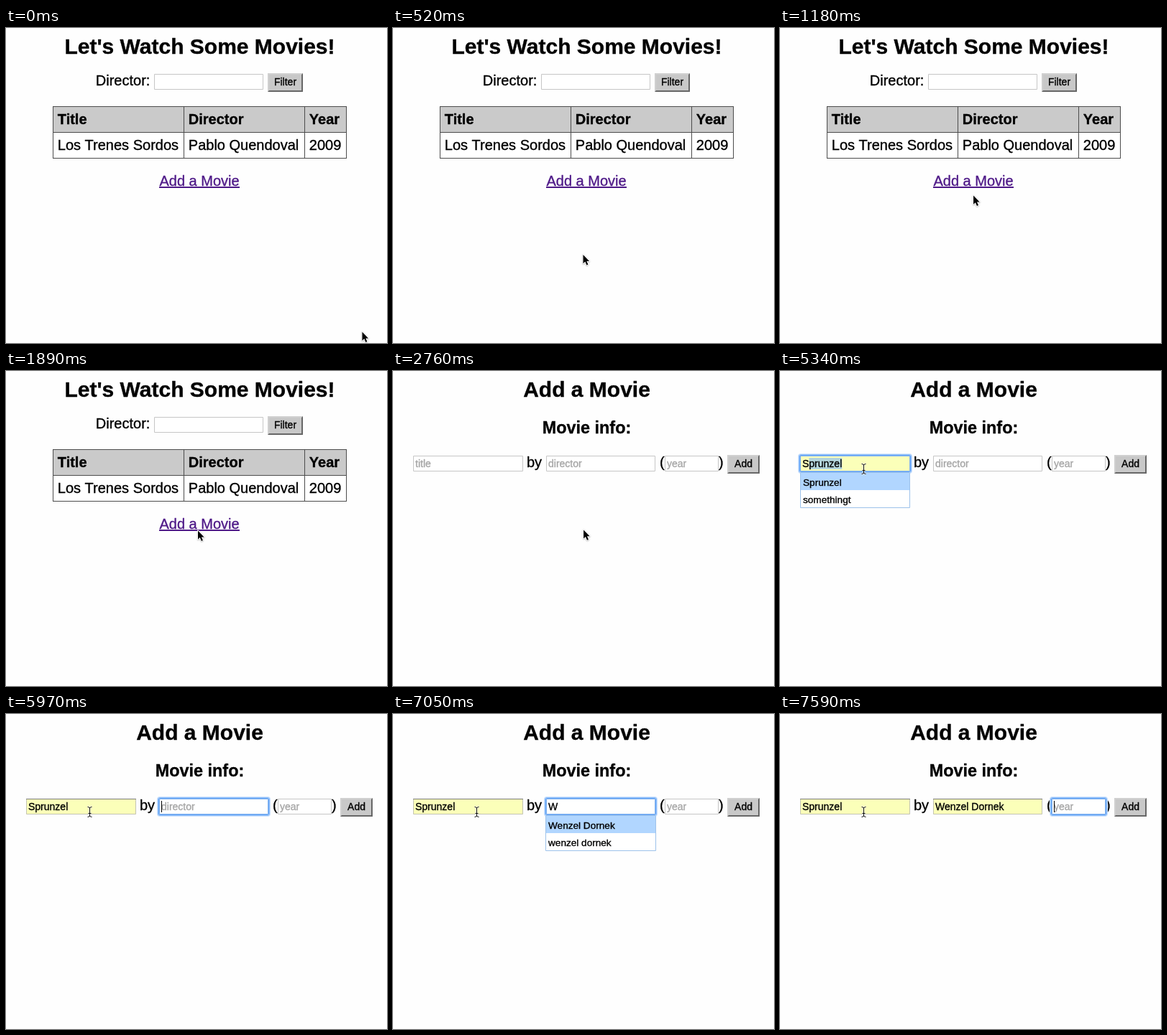
Animation of 530 by 439 pixels, one loop 8000 ms. Source, as an HTML page with a canvas:

```html
<!DOCTYPE html>
<html lang="en">
<head>
<meta charset="utf-8">
<title>Movies</title>
<style>
html, body { margin: 0; width: 100%; height: 100%; overflow: hidden; background: #fefefe; }
canvas { display: block; }
</style>
</head>
<body>
<canvas id="stage" width="530" height="439"></canvas>
<script>
const ctx = document.getElementById('stage').getContext('2d');
const LOOP = 8000;
const FONT = '"Liberation Sans", Arial, sans-serif';
const TITLE = 'Sprunzel', DIRECTOR = 'Wenzel Dornek';
const YELLOW = '#fbffb9', PICKED = '#b1d6ff';

const smooth = p => p * p * (3 - 2 * p);
const easeOut = p => 1 - Math.pow(1 - p, 2.4);

function rect(x, y, w, h, color) {
  ctx.fillStyle = color;
  ctx.fillRect(x, y, w, h);
}

function frame(x, y, w, h, color) {
  ctx.strokeStyle = color;
  ctx.lineWidth = 1;
  ctx.strokeRect(x + 0.5, y + 0.5, w - 1, h - 1);
}

// A hairline stroke gives the text its slightly heavy look.
function text(str, x, y, size, color = '#000', weight = 'normal', align = 'left') {
  ctx.font = `${weight} ${size}px ${FONT}`;
  ctx.textAlign = align;
  ctx.fillStyle = ctx.strokeStyle = color;
  ctx.lineWidth = 0.35;
  ctx.lineJoin = 'round';
  ctx.fillText(str, x, y);
  ctx.strokeText(str, x, y);
}

function heading(str, y, size) {
  text(str, 269.5, y, size, '#000', 'bold', 'center');
}

function widthOf(str, size) {
  ctx.font = `${size}px ${FONT}`;
  return ctx.measureText(str).width;
}

function button(label, x, y, w) {
  const h = 26;
  rect(x, y, w, h, '#676767');
  ctx.beginPath();
  ctx.moveTo(x, y);
  ctx.lineTo(x + w, y);
  ctx.lineTo(x + w - 2, y + 2);
  ctx.lineTo(x + 2, y + h - 2);
  ctx.lineTo(x, y + h);
  ctx.fillStyle = '#d0d0d0';
  ctx.fill();
  rect(x + 2, y + 2, w - 4, h - 4, '#c8c8c8');
  text(label, x + w / 2, y + 17, 14, '#000', 'normal', 'center');
}

function focusRing(x, y, w, h) {
  ['#cfe3fd', '#92c1fa', '#68a6f5'].forEach((color, i) => {
    const out = 2.5 - i;
    ctx.beginPath();
    ctx.roundRect(x - out, y - out, w + 2 * out, h + 2 * out, 3.5 - i);
    ctx.strokeStyle = color;
    ctx.lineWidth = 1.1;
    ctx.stroke();
  });
  frame(x, y, w, h, '#83b3ef');
}

// Text field; `typed` is the part before the selected completion.
function field(x, y, w, o = {}) {
  const h = 22, tx = x + 3, base = y + 16;
  rect(x, y, w, h, o.filled ? YELLOW : '#fff');
  frame(x, y, w, h, o.filled ? '#c3c3b4' : '#c6c6c6');
  if (o.filled) rect(x, y, w, 1, '#7d7d78');
  if (o.focus) focusRing(x, y, w, h);
  if (o.value) {
    if (o.typed) {
      const from = widthOf(o.typed, 14);
      rect(tx + from, y + 3, widthOf(o.value, 14) - from, 16, '#b4d5dc');
    }
    text(o.value, tx, base, 14);
  } else if (o.hint) {
    text(o.hint, tx, base, 14, '#a6a6a6');
  }
  if (o.caret) {
    const end = o.value ? Math.round(widthOf(o.value, 14)) : 0;
    rect(tx + end, y + 3, 1, 16, '#000');
  }
}

function dropdown(x, w, items, picked) {
  rect(x, 141, w, 50, '#fff');
  if (picked) rect(x, 142, w, 24, PICKED);
  frame(x, 141, w, 50, '#9dc2ea');
  items.forEach((s, i) => text(s, x + 4, 160 + 24 * i, 13.6));
}

function listPage(t) {
  heading("Let's Watch Some Movies!", 36, 30);
  text('Director:', 124.8, 80, 20);
  field(206, 64, 152);
  button('Filter', 364, 63, 49);

  rect(65, 109, 409, 73, '#fff');
  rect(65, 109, 409, 36, '#cacaca');
  for (const y of [109, 145, 181]) rect(65, y, 409, 1, '#4c4c4c');
  for (const x of [65, 247, 415, 473]) rect(x, 109, 1, 73, '#4c4c4c');
  const rows = [['Title', 'Director', 'Year'], ['Los Trenes Sordos', 'Pablo Quendoval', '2009']];
  rows.forEach((row, r) => row.forEach((s, c) =>
    text(s, [71.8, 253.8, 421.8][c], 134 + 36 * r, 20, '#000', r ? 'normal' : 'bold')));

  const link = t >= 1740 && t < 1890 ? '#f00' : '#4f1a88';
  text('Add a Movie', 269, 220, 20, link, 'normal', 'center');
  rect(213, 221, 112, 2, link);
}

function formPage(t) {
  heading('Add a Movie', 36, 30);
  heading('Movie info:', 87, 23.4);
  text('by', 186, 134, 20);
  text('(', 371, 134, 20);
  text(')', 453, 134, 20);
  button('Add', 465, 117, 45);

  const title = { hint: 'title', focus: t >= 3370 && t < 5970 };
  if (t >= 5340) {
    title.value = TITLE;
    title.filled = true;
    if (t < 5610) title.typed = 'S';
    title.caret = t >= 5610 && t < 5970;
  } else {
    if (t >= 4840) title.value = 'S';
    title.caret = title.focus && (t < 3880 || t >= 4360);
  }

  const director = { hint: 'director', focus: t >= 5970 && t < 7590 };
  if (t >= 7080) {
    director.value = DIRECTOR;
    director.filled = true;
    if (t < 7260) director.typed = 'W';
    director.caret = t >= 7260 && t < 7590;
  } else {
    if (t >= 6450) director.value = 'W';
    director.caret = director.focus && t < 7050;
  }

  const year = { hint: 'year', focus: t >= 7590, caret: t >= 7590 };

  field(28, 118, 153, title);
  field(213, 118, 152, director);
  field(378, 118, 75, year);

  if (t >= 4840 && t < 5610) dropdown(28, 153, [TITLE, 'somethingt'], t >= 5340);
  if (t >= 6540 && t < 7260) {
    dropdown(212, 154, [DIRECTOR, DIRECTOR.toLowerCase()], t >= 7050);
  }
}

// Pointer moves: start, end, steps, target, easing, sideways bow
const moves = [
  { a: 150, b: 520, n: 12, to: [263.5, 314.5], ease: smooth, bow: 0 },
  { a: 880, b: 1410, n: 17, to: [266, 221], ease: easeOut, bow: 6.5 },
  { a: 2760, b: 3160, n: 15, to: [116, 136], ease: smooth, bow: 0 }
];

function pointerAt(t) {
  let pos = [494.5, 422];
  for (const m of moves) {
    if (t < m.a) break;
    const step = Math.floor((t - m.a) / (m.b - m.a) * (m.n - 1) + 1e-6) + 1;
    const p = m.ease(Math.min(1, step / m.n));
    pos = pos.map((v, i) => v + (m.to[i] - v) * p);
    pos[0] += m.bow * Math.sin(Math.PI * p);
  }
  return pos;
}

function arrow(x, y) {
  ctx.beginPath();
  [[0, 0], [0, 12.2], [2.8, 9.6], [4.9, 14.4], [6.9, 13.5], [4.9, 8.9], [8.6, 8.9]]
    .forEach(([dx, dy]) => ctx.lineTo(x + 1 + dx, y + 1.5 + dy));
  ctx.closePath();
  ctx.lineJoin = 'round';
  ctx.strokeStyle = '#fff';
  ctx.lineWidth = 2;
  ctx.save();
  ctx.shadowColor = 'rgba(0,0,0,.35)';
  ctx.shadowBlur = 1.5;
  ctx.shadowOffsetY = 0.5;
  ctx.stroke();
  ctx.restore();
  ctx.fillStyle = '#000';
  ctx.fill();
}

function beam(x, y) {
  x = Math.round(x) + 0.5;
  y = Math.round(y) + 0.5;
  ctx.beginPath();
  for (const s of [-1, 1]) {
    ctx.moveTo(x - 3, y + s * 7);
    ctx.quadraticCurveTo(x, y + s * 7, x, y + s * 5);
    ctx.quadraticCurveTo(x, y + s * 7, x + 3, y + s * 7);
  }
  ctx.moveTo(x, y - 6);
  ctx.lineTo(x, y + 6);
  ctx.moveTo(x - 2, y + 2);
  ctx.lineTo(x + 2, y + 2);
  ctx.strokeStyle = 'rgba(255,255,255,.6)';
  ctx.lineWidth = 2.4;
  ctx.stroke();
  ctx.strokeStyle = '#111';
  ctx.lineWidth = 1;
  ctx.stroke();
}

function draw(now) {
  const t = now % LOOP;
  rect(0, 0, 530, 439, '#fefefe');
  (t < 2100 ? listPage : formPage)(t);
  const [x, y] = pointerAt(t);
  (x < 181 && y < 140 ? beam : arrow)(x, y);
}

const start = performance.now();
function tick() {
  draw(performance.now() - start);
  requestAnimationFrame(tick);
}
tick();
</script>
</body>
</html>
```
